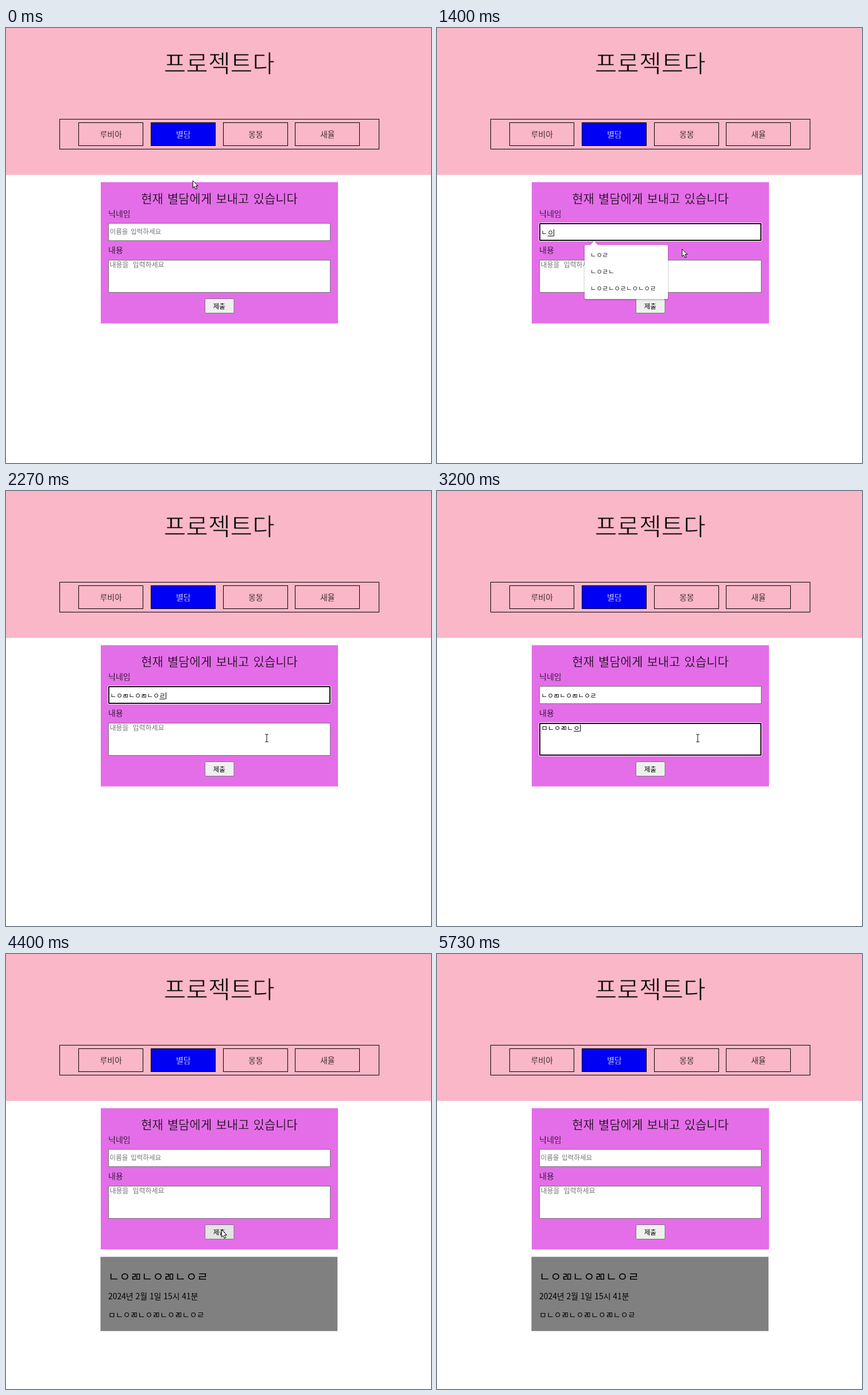
Write an HTML page that moves like this. It is 740 px wide and 756 px high and loops after 6790 ms.

```html
<!DOCTYPE html>
<html lang="ko">
<head>
<meta charset="utf-8">
<title>프로젝트다</title>
<style>
  html, body { margin: 0; width: 100%; height: 100%; overflow: hidden; background: #fff; }
  svg { display: block; width: 740px; height: 756px; }
  text { font-family: "Noto Sans CJK KR", "Noto Sans CJK", "Noto Sans", sans-serif; white-space: pre; }
</style>
</head>
<body>
<svg id="stage" viewBox="0 0 740 756" xmlns="http://www.w3.org/2000/svg"></svg>
<script>
const LOOP = 6790, TICK = 200 / 3;
const HANGUL = 0.92; // advance of one syllable or letter, in em
const PINK = '#fab7c8', VIOLET = '#e46ee8', BLUE = '#0000f5';
const svg = document.getElementById('stage');

function el(tag, attrs, parent = svg) {
  const node = document.createElementNS('http://www.w3.org/2000/svg', tag);
  for (const k in attrs) node.setAttribute(k, attrs[k]);
  parent.appendChild(node);
  return node;
}
const group = (parent) => el('g', {}, parent);
const box = (x, y, w, h, attrs, parent) =>
  el('rect', { x, y, width: w, height: h, ...attrs }, parent);

// Text placed by the vertical centre of its letters
function label(str, x, cy, size, attrs = {}, parent) {
  const node = el('text', { x, y: cy + size * 0.38, 'font-size': size, ...attrs }, parent);
  node.textContent = str;
  return node;
}
// An edge in the ground colour gives letters a lighter weight
const thin = (ground, w) => ({ stroke: ground, 'stroke-width': w });
const show = (node, on) => node.setAttribute('visibility', on ? 'visible' : 'hidden');

// Header
const MID = { 'text-anchor': 'middle' };
const LINE = { fill: 'none', stroke: '#000' };
box(0, 0, 740, 255.3, { fill: PINK });
label('프로젝트다', 371.3, 61.5, 42, { ...MID, ...thin(PINK, 0.9) });
box(93.5, 158.5, 556, 52, LINE);
const members = ['루비아', '별담', '몽몽', '새율'];
members.forEach((name, i) => {
  const x = Math.round(126.45 + i * 125.55) + 0.5, on = i === 1;
  const ground = on ? BLUE : PINK;
  box(x, 164.5, 112, 40, { ...LINE, fill: ground });
  label(name, x + 56.3, 184.8, 14, { ...MID, ...thin(ground, 0.25), fill: on ? '#fff' : '#000' });
});

// Form
box(165, 268, 413, 245.5, { fill: VIOLET });
label(`현재 ${members[1]}에게 보내고 있습니다`, 371.5, 296, 21,
  { ...MID, ...thin(VIOLET, 0.4), 'word-spacing': 1.3 });
label('닉네임', 178, 322.4, 14, thin(VIOLET, 0.25));
label('내용', 178, 386, 14, thin(VIOLET, 0.25));

function field(y, h, hint, hintY, hintSize, gap, textY, size) {
  box(178.5, y, 386, h, { fill: '#fff', stroke: '#767676' });
  const ring = group();
  box(177.5, y - 1, 388, h + 2, { fill: 'none', stroke: '#fff', rx: 2 }, ring);
  box(179, y + 0.5, 385, h - 1, { fill: 'none', stroke: '#101010', 'stroke-width': 2, rx: 1 }, ring);
  const holder = label(hint, 180.5, hintY, hintSize, { fill: '#757575', 'word-spacing': gap });
  const text = label('', 181.5, textY, size);
  const under = el('path', { stroke: '#000' });
  const caret = el('path', { stroke: '#000' });
  return (value, focus) => {
    const end = 181.5 + value.length * size * HANGUL;
    text.textContent = value;
    show(holder, !value);
    show(ring, focus);
    show(caret, focus);
    show(under, focus && value);
    const cx = Math.round(end) + 0.5, top = value ? textY - 6 : hintY - 6;
    caret.setAttribute('d', `M${cx} ${top}v12`);
    under.setAttribute('d', `M${end - size * HANGUL + 0.5} ${textY + 5.5}H${end - 0.5}`);
  };
}
const setName = field(339.5, 30, '이름을 입력하세요', 354, 11.6, 1.2, 356, 11.6);
const setBody = field(403.5, 56, '내용을 입력하세요', 411, 12, 3.4, 412, 12.2);

const button = box(346.5, 470.5, 50.5, 25, { fill: '#efefef', stroke: '#767676', rx: 2 });
label('제출', 371.3, 483.3, 11.5, MID);

// Posted message
const ROLL = 'ㄴㅇㄹㅁ';
const NAME_KEYS = ROLL.repeat(2) + 'ㄴㅇㄹ';
const BODY_KEYS = 'ㅁ' + ROLL.repeat(3) + 'ㄴㅇㄹ';
const typed = (keys, n) => keys.slice(0, n).replace(/ㄹㅁ/g, 'ㄻ');

const card = group();
box(164.5, 526.3, 412.7, 129, { fill: '#808080' }, card);
label(typed(NAME_KEYS), 178, 560, 21, { 'font-weight': 500 }, card);
label('2024년 2월 1일 15시 41분', 178, 594.3, 13.9, {}, card);
label(typed(BODY_KEYS), 178, 627, 14, {}, card);

// Suggestion lists
function popup(w, h, items) {
  const g = group();
  g.style.filter = 'drop-shadow(0 1px 1.5px rgba(0,0,0,.35))';
  box(257, 377, w, h, { fill: '#fff', rx: 2.5 }, g);
  el('path', { d: 'M266.5 377.5L273.5 370.5L280.5 377.5Z', fill: '#fff' }, g);
  items.forEach((s, i) => {
    const size = /[a-z\d]/.test(s) ? 10.4 : 11.3;
    label(s, 267, 395 + i * 29.1, size, { fill: '#202124' }, g);
  });
  return g;
}
const allList = popup(126, 181, ['sdf', '노가온', 'ㄴㅇㄹ', 'd', 'df', '123']);
const nearList = popup(145, 94, ['ㄴㅇㄹ', 'ㄴㅇㄹㄴ', 'ㄴㅇㄹㄴㅇㄹㄴㅇㄴㅇㄹ']);

// Pointer
const arrow = el('path', {
  d: 'M.3 .3V13L3.2 10.3L5.3 15.2L7.6 14.2L5.5 9.4H9.4Z',
  fill: '#fff', stroke: '#000', 'stroke-width': 1
});
const beam = el('path', {
  d: 'M-3 -6.5H-1L0 -5.5L1 -6.5H3M0 -5.5V5.5M-3 6.5H-1L0 5.5L1 6.5H3',
  fill: 'none', stroke: '#222', 'stroke-width': 1.1
});

const path = [ // time, x, y
  [0, 325, 265], [400, 301.5, 359.5], [600, 301.5, 359.5], [730, 312, 361],
  [870, 312, 361], [1330, 426.5, 384], [1530, 426.5, 384], [2130, 454, 429.5],
  [3800, 454, 429.5], [4070, 375, 479], [4470, 375, 479], [4600, 382, 483],
  [4930, 440.5, 480], [5200, 470, 470], [5730, 565, -20]
];
function pointerAt(t) {
  const i = path.findIndex((p) => p[0] > t);
  if (i < 0) return null;
  const [t0, x0, y0] = path[i - 1], [t1, x1, y1] = path[i];
  const u = (t - t0) / (t1 - t0), k = u * u * (3 - 2 * u);
  return [x0 + (x1 - x0) * k, y0 + (y1 - y0) * k];
}
const inside = ([x, y], top, bottom, left = 178, right = 565) =>
  x > left && x < right && y > top && y < bottom;

const steps = (from, count) => Array.from({ length: count }, (_, i) => from + i * TICK);
const nameTimes = [...steps(1330, 3), ...steps(1600, 8)];
const bodyTimes = [2667, ...steps(2867, 10), 3600, ...steps(3800, 4)];
const FOCUS = 330, LIST = 400, SWITCH = 2400, POST = 4330;

function draw(ms) {
  // the screen refreshes 15 times a second
  const t = Math.floor((ms + 4) / TICK) * TICK + 4;
  const count = (times) => times.filter((at) => at <= t).length;
  const posted = t >= POST;
  const nameCount = posted ? 0 : count(nameTimes);
  const bodyCount = posted ? 0 : count(bodyTimes);

  setName(typed(NAME_KEYS, nameCount), t >= FOCUS && t < SWITCH);
  setBody(typed(BODY_KEYS, bodyCount), t >= SWITCH && !posted);
  show(allList, t >= LIST && !posted && !nameCount);
  show(nearList, nameCount > 0 && nameCount < 4);
  show(card, posted);

  const p = pointerAt(t);
  const overText = p && (inside(p, 339, 370) || inside(p, 403, 460));
  show(arrow, p && !overText);
  show(beam, overText);
  if (p) {
    const at = `translate(${p[0]} ${p[1]})`;
    arrow.setAttribute('transform', at);
    beam.setAttribute('transform', at);
  }
  button.setAttribute('fill', p && inside(p, 470, 496, 346, 397) ? '#e3e3e3' : '#efefef');
}

const start = performance.now();
function frame() {
  draw((performance.now() - start) % LOOP);
  requestAnimationFrame(frame);
}
draw(0);
requestAnimationFrame(frame);
</script>
</body>
</html>
```
